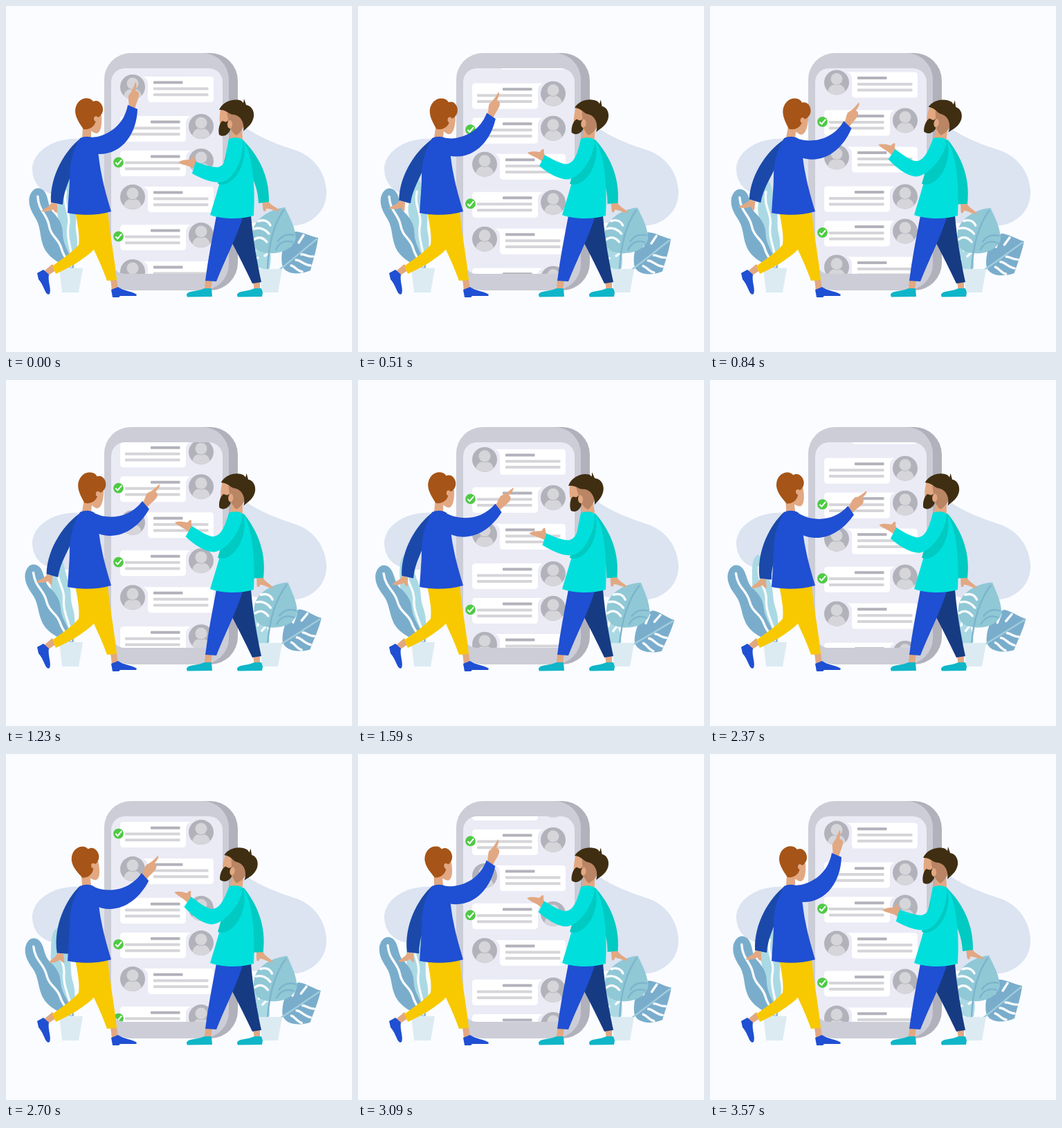
Recreate the animation shown at these times as an HTML page. Size 500 by 500 pixels, loop 3600 ms.

```html
<!DOCTYPE html>
<html lang="en">
<head>
<meta charset="utf-8">
<title>Chat list</title>
<style>
  html, body { margin: 0; width: 100%; height: 100%; overflow: hidden; background: #fafcff; }
  svg { display: block; width: 100vw; height: 100vh; }
  .skin { fill: #e2a882; }
  .blue { fill: #1f4fd2; }
  .navy { fill: #1a49aa; }
  .cyan { fill: #00dfdc; }
  .teal { fill: #00cac2; }
  .hair { fill: #3f2e12; }
  .shoe { fill: #0fb6c8; }
  .pot { fill: #dcebf2; }
  .pale { fill: #aad9e4; }
  .leaf { fill: #7aadcc; }
  .mint { fill: #90c8d6; }
  .slit { fill: none; stroke: #f8fbfe; stroke-width: 3.4; stroke-linecap: round; }
  .vein { fill: none; stroke-width: 2.4; stroke-linecap: round; }
</style>
</head>
<body>
<svg viewBox="0 0 500 500" xmlns="http://www.w3.org/2000/svg">
  <defs>
    <clipPath id="screen"><rect x="152" y="90" width="161" height="297" rx="20"/></clipPath>
    <g id="face">
      <circle r="18" fill="#b2b2bb"/>
      <path fill="#d5d5da" d="M-12.7,12.7 C-11,5 -6,2.5 0,2.5 C6,2.5 11,5 12.7,12.7 A18,18 0 0 1 -12.7,12.7Z"/>
      <circle cy="-5" r="9.2" fill="#b2b2bb"/>
      <circle cy="-5" r="8.5" fill="#d5d5da"/>
    </g>
    <g id="tick">
      <circle r="7.4" fill="#4fca45"/>
      <path d="M-4.2,.2 L-1.2,3.2 L4.6,-3.6" fill="none" stroke="#fff" stroke-width="2"/>
    </g>
  </defs>

  <path fill="#dce3f1" d="M108,192 C70,189 38,210 38,236 C39,264 60,275 90,274 L160,272 L300,300 C350,312 400,325 432,314 C455,304 464,286 463,266 C461,240 445,217 417,208 C392,200 368,191 345,175 L320,170 L160,200Z"/>

  <!-- phone -->
  <rect x="180" y="68" width="155" height="343" rx="40" fill="#b1b1bc"/>
  <rect x="142" y="68" width="180" height="343" rx="38" fill="#cccdd7"/>
  <rect x="152" y="90" width="161" height="297" rx="20" fill="#ebebf6"/>
  <g clip-path="url(#screen)"><g id="list"></g></g>

  <!-- left plant -->
  <g id="leafBack">
    <path class="pale" d="M92,379 C86,355 73,345 77,325 C79,310 71,300 75,285 C77,270 79,253 88,250 C98,254 96,275 100,290 C104,305 99,315 102,330 C105,345 101,360 98,379Z"/>
    <path class="slit" d="M87,268 C82,290 95,300 90,320 C87,340 98,355 95,376"/>
  </g>
  <g id="leafFront">
    <path class="leaf" d="M96,379 C78,374 58,362 53,344 C49,332 50,318 43,307 C37,297 32,288 34,276 C38,262 48,260 55,267 C62,275 60,288 67,297 C75,305 82,315 82,328 C82,345 92,355 98,378Z"/>
    <path class="slit" d="M46,275 C47,296 59,300 62,316 C65,334 76,335 80,350 C83,362 89,368 94,376"/>
  </g>
  <path class="pot" d="M77,378 L111,379 L105,414 L81,414Z"/>

  <!-- right plant -->
  <g id="fernPale">
    <path class="pale" d="M377,381 C354,379 341,356 350,335 C372,325 388,346 381,379Z"/>
    <path class="slit" d="M352,352 L360,354 M354,364 L364,364 M374,344 L370,352 M381,356 L374,361"/>
  </g>
  <g id="fernDark">
    <path class="leaf" d="M451,335 C440,333 428,326 418,326 C404,334 396,352 399,374 C403,389 425,389 440,382 C444,366 449,352 451,335Z"/>
    <path class="slit" d="M444,362 C436,363 431,358 427,359 M440,375 C430,374 424,366 419,367 M428,384 C421,383 417,376 412,375 M430,331 L423,342 M414,333 L411,346"/>
    <path class="vein" stroke="#a0cddb" d="M391,384 C410,370 430,352 449,337"/>
  </g>
  <g id="fernMint">
    <path class="mint" d="M403,291 C385,293 363,304 357,323 C354,338 358,350 366,354 C378,360 402,358 412,347 C418,341 420,336 418,329 C416,315 408,302 403,291Z"/>
    <path class="slit" d="M365,311 C373,308 379,311 382,317 M359,322 C368,319 376,324 380,329 M358,338 C365,332 372,335 377,341"/>
    <path class="vein" stroke="#7db4cc" d="M378,381 C379,350 384,320 401,295 M390,352 C395,341 404,338 414,341 M393,340 C399,331 407,329 416,331"/>
  </g>
  <path class="pot" d="M366,380 L399,380 L393,414 L370,414Z"/>

  <!-- left man -->
  <g id="armBackL">
    <path class="navy" d="M108,191 C86,208 63,245 65,284 L82,287 C83,266 94,248 98,232 L112,205Z"/>
    <path class="skin" d="M66,284 L74,286 L74,299 C71,299 69,295 68,294 C62,298 56,297 51,297 C55,292 62,291 66,284Z"/>
  </g>
  <path class="skin" d="M55,383 L67,373 L72,382 L60,390Z M151,395 H160 L162,409 L153,411Z"/>
  <path class="blue" d="M45,386 L54,381 L62,388 C60,398 66,409 63,416 C57,420 56,405 47,395Z"/>
  <path class="blue" d="M152,410 L162,406 C170,412 185,413 189,417 L188,419 L165,419 L163,421 L154,421Z"/>
  <path fill="#f8c900" d="M100,296 L147,296 C150,330 157,365 160,396 L146,397 C140,380 133,365 127,352 C113,366 92,378 72,387 L67,376 C80,366 96,356 105,345 C107,330 103,315 100,296Z"/>
  <g id="headL">
    <path class="skin" d="M111,174 L123,174 L123,192 L110,192Z"/>
    <path class="skin" d="M126,158 L138,158 C139,172 137,183 131,184 C127,184 124,180 119,179 L114,170Z"/>
    <path fill="#a65417" d="M100,151 C101,138 111,131 121,134 C124,135 125,137 126,138 C134,134 141,143 140,151 C139,157 135,161 132,161 L128,171 C124,177 118,179 112,178 C106,169 100,161 100,151Z"/>
    <ellipse class="skin" cx="130" cy="163" rx="3" ry="3.8"/>
  </g>
  <path class="blue" d="M107,191 C114,188 122,188 128,192 C134,206 134,225 138,243 C142,264 147,280 152,297 C130,303 108,303 89,299 C90,280 92,262 92,245 C92,228 96,210 107,191Z"/>
  <g id="armL">
    <path class="skin" d="M177,149 C179,140 175,132 178,128 C182,124 184,118 187,110 C190,113 188,118 187,123 C190,122 193,126 192,130 C190,139 187,142 186,151Z"/>
    <path class="blue" d="M114,194 C120,189 125,190 132,189 C152,184 171,170 176,143 L190,149 C189,183 169,215 133,214 L118,212Z"/>
  </g>

  <!-- right man -->
  <g id="armBackR">
    <path class="skin" d="M370,282 L379,281 C382,289 391,290 396,296 C388,297 381,292 376,293 C376,296 374,298 372,296 C371,292 371,288 370,282Z"/>
    <path class="teal" d="M342,193 C361,212 381,242 380,283 L365,285 C364,258 352,240 342,222Z"/>
  </g>
  <path class="skin" d="M288,396 H298 L296,410 H287Z M357,398 H367 V411 H359Z"/>
  <path class="shoe" d="M261,418 C261,411 276,413 287,408 L297,408 L298,420 L262,420.500Z"/>
  <path class="shoe" d="M334,418 C334,411 349,413 359,408 L369,408 L371,414 L370,420 L335,420.500Z"/>
  <path fill="#163b82" d="M336,303 L354,303 C357,340 364,375 369,399 L356,401 C346,380 336,360 327,343Z"/>
  <path class="blue" d="M304,303 L343,303 C333,335 315,370 304,398 L288,397 C292,365 298,335 304,303Z"/>
  <g id="headR">
    <path class="skin" d="M325,178 L341,176 L342,193 L324,193Z"/>
    <path class="skin" d="M311,146 L325,146 L326,176 L310,176 C308,166 308,156 311,146Z"/>
    <path fill="#ba8564" d="M319,154 C330,152 344,156 345,166 C344,178 338,183 333,187 C329,185 326,180 324,177Z"/>
    <path class="hair" d="M308,186 C306,178 309,168 313,166 C316,167 319,169 321,165 L324,179 C321,187 313,190 308,186Z"/>
    <ellipse class="skin" cx="323.500" cy="171" rx="3.600" ry="6"/>
    <path class="hair" d="M308,150 C314,137 330,133 340,137 L343,140 L344,134 L347,143 C355,144 359,152 358,160 C356,171 349,175 343,181 C345,170 340,159 330,157 C321,157 320,150 308,150Z"/>
  </g>
  <path class="cyan" d="M322,192 C330,189 339,190 343,194 C355,212 361,255 358,303 C338,309 312,308 295,302 C303,275 314,243 318,212Z"/>
  <path class="teal" d="M342,193 C349,213 341,241 325,253 C318,258 312,259 306,257 L318,215Z"/>
  <g id="armR">
    <path class="skin" d="M276,227 C271,223 273,219 271,217 C268,217 268,221 266,222 C259,222 253,223 249,226 C254,230 263,230 270,234 L275,235Z"/>
    <path class="cyan" d="M322,193 C320,212 320,230 306,233 C296,233 285,229 274,225 L269,242 C283,250 301,257 314,254 C331,248 344,218 342,194 C335,190 328,190 322,193Z"/>
  </g>
</svg>

<script>
const LOOP = 3600;
const BLOCK = 267;
const $ = id => document.getElementById(id);

// Chat rows: offset inside a block, side of the portrait, ticked or not
const rows = [[0, 'L'], [57, 'R'], [107, 'R', true], [159, 'L'], [214, 'R', true]];

const bar = (x, y, w, fill) => `<rect x="${x}" y="${y - 2}" width="${w}" height="4" rx="1" fill="${fill}"/>`;

function row(y, side, done) {
  const left = side === 'L';
  const x = left ? 205 : 165;
  const text = x + (left ? 8 : 7);
  const card = left
    ? 'M-7,0 H90 Q95,0 95,5 V32 Q95,37 90,37 H5 Q0,37 0,32 V10 Q0,3 -7,0Z'
    : 'M5,0 H102 Q95,3 95,10 V32 Q95,37 90,37 H5 Q0,37 0,32 V5 Q0,0 5,0Z';
  return `<g transform="translate(0 ${y})">
    <path transform="translate(${x})" d="${card}" fill="#fff"/>
    ${bar(left ? text : 209, 8.6, 42.5, '#b2b2bc')}
    ${[17.5, 26.2].map(dy => bar(text, dy, 79.5, '#d5d5d9')).join('')}
    <use href="#face" x="${left ? 183 : 282}" y="15"/>
    ${done ? '<use href="#tick" x="162.5" y="17"/>' : ''}</g>`;
}

$('list').innerHTML = [0, 1, 2].map(block =>
  rows.map(([y, side, done]) => row(102 + block * BLOCK + y, side, done)).join('')).join('');

// Everything is built from slow waves that fit the loop
const wave = (t, n = 1) => Math.sin(2 * Math.PI * n * t / LOOP);
const swing = (t, n = 1) => wave(t, n / 2) ** 2;            // 0 to 1 and back, n times
const lean = t => wave(t) * Math.sqrt(Math.abs(wave(t)));   // lingers upright

const scroll = t => 430 * swing(t) - 10 * swing(t, 2) - 9.5 * wave(t) - 21 * wave(t, 2) + 3.4 * wave(t, 3);

const turn = (id, x, y, angle) => ({ el: $(id), x, y, angle });
const joints = [
  turn('armL', 120, 203, t => 31.4 * swing(t) + 7.6 * swing(t, 2) + 1.5 * (wave(t, 2) - wave(t))),
  turn('headL', 117, 190, t => 8 * lean(t)),
  turn('armBackL', 104, 202, t => 6 * lean(t)),
  turn('armR', 330, 195, t => 18 * swing(t - 40, 2)),
  turn('headR', 335, 190, t => 12 * swing(t, 2) - 8 * swing(t) ** 2),
  turn('armBackR', 345, 205, t => 4.2 * swing(t, 2) + 3.6 * swing(t)),
  turn('leafFront', 95, 378, t => -5.6 * swing(t - 150)),
  turn('leafBack', 95, 378, t => -10 * swing(t - 150)),
  turn('fernDark', 378, 380, t => 9.5 * swing(t - 60)),
  turn('fernMint', 378, 380, t => 4 * swing(t - 60)),
  turn('fernPale', 378, 380, t => -18 * swing(t - 60))
];

function draw(t) {
  $('list').setAttribute('transform', `translate(0 ${-scroll(t)})`);
  for (const j of joints) j.el.setAttribute('transform', `rotate(${j.angle(t)} ${j.x} ${j.y})`);
}

let start;
function tick(now) {
  start ??= now;
  draw((now - start) % LOOP);
  requestAnimationFrame(tick);
}
draw(0);
requestAnimationFrame(tick);
</script>
</body>
</html>
```
